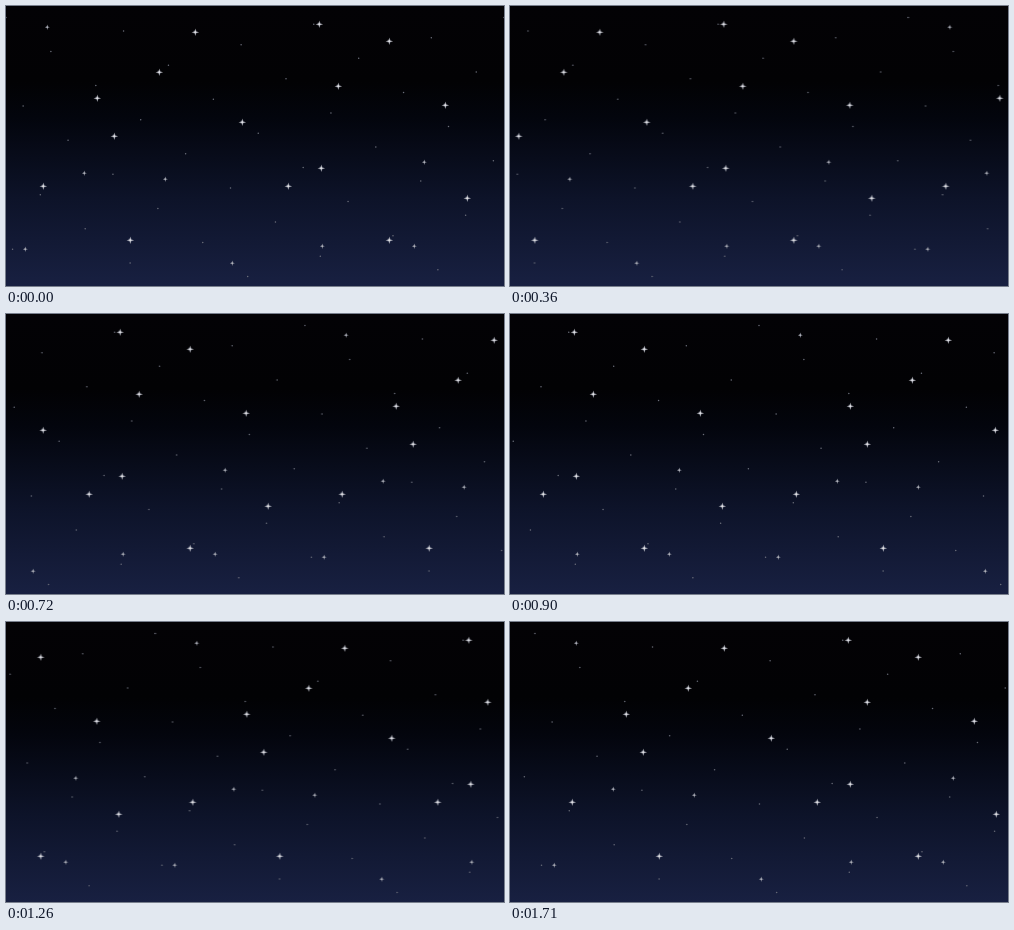
Recreate the animation shown at these times as an HTML page. Size 498x280 px, loop 1.8 s.

```html
<!DOCTYPE html>
<html lang="en">
<head>
<meta charset="utf-8">
<title>Drifting stars</title>
<style>
  html, body { margin: 0; width: 100%; height: 100%; overflow: hidden; background: #000; }
  svg {
    display: block; width: 100%; height: 100%;
    background: linear-gradient(#030205, #020204 27%, #03050d 40%, #0d1329 69%, #182041);
  }
  #sky { animation: drift 1800ms steps(20, end) infinite; }
  @keyframes drift { to { transform: translateX(-498px); } }
</style>
</head>
<body>
<svg viewBox="0 0 498 280" preserveAspectRatio="none">
  <defs>
    <g id="large">
      <circle r="2.2" fill="#a9b2cc" opacity=".2"/>
      <path d="M0-3.8L.7-.7 3.8 0 .7.7 0 3.8-.7.7-3.8 0-.7-.7Z" fill="#c4c5cc"/>
      <circle r=".9" fill="#dedfe4"/>
    </g>
    <g id="medium">
      <path d="M0-2.7L.6-.6 2.5 0 .6.6 0 2.7-.6.6-2.5 0-.6-.6Z" fill="#989ba6"/>
      <circle r=".8" fill="#b4b6be"/>
    </g>
    <circle id="dot" r=".75" fill="#6c6f7b"/>
  </defs>
  <g id="sky">
    <g id="tile"></g>
    <use href="#tile" x="498"/>
  </g>
</svg>
<script>
  const width = 498, height = 280, dotCount = 39;

  // Key stars as "x,y"; the faint dots are scattered by rule.
  const large = '189,26 313,18 383,35 153,66 91,92 332,80 439,99 236,116 108,130 315,162 282,180 37,180 461,192 124,234 383,234';
  const medium = '41,21 418,156 78,167 159,173 316,240 408,240 19,243 226,257';

  const star = (kind, x, y) => `<use href="#${kind}" x="${x}" y="${y}"/>`;
  const keyStars = (kind, spots) => spots.split(' ').map(spot => {
    const [x, y] = spot.split(',').map(Number);
    return star(kind, x + .3, y + .2);
  });

  // Golden-ratio steps spread the dots evenly without a visible grid.
  const dots = Array.from({ length: dotCount }, (_, i) =>
    star('dot', (i * 0.618034 % 1) * width, 8 + (i + .5) / dotCount * (height - 14)));

  document.getElementById('tile').innerHTML =
    [...keyStars('large', large), ...keyStars('medium', medium), ...dots].join('');
</script>
</body>
</html>
```
